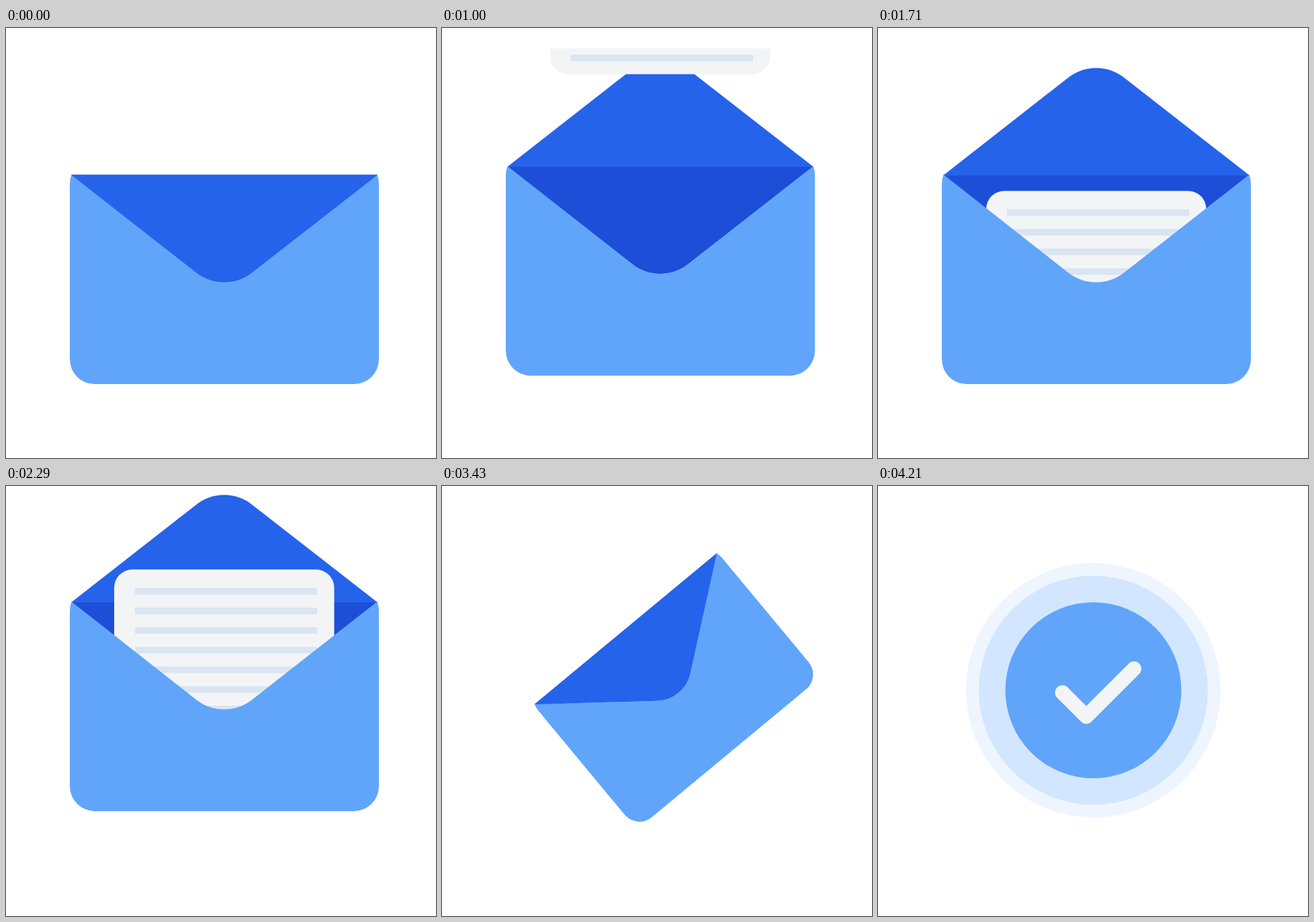
An HTML page for the animation above (4780 ms loop, 640x640 px).

```html
<!DOCTYPE html>
<html lang="en">
<head>
<meta charset="utf-8">
<title>Envelope</title>
<style>
  html, body { margin: 0; width: 100%; height: 100%; overflow: hidden; background: #fff; }
  svg { display: block; width: 100%; height: 100%; }
</style>
</head>
<body>
<svg viewBox="0 0 640 640">
  <defs>
    <path id="triangle" d="M97 218.6L283 364A67 67 0 0 0 366.4 364L553 218.6Z"/>
    <clipPath id="window"><rect x="90" y="43" width="470" height="487"/></clipPath>
  </defs>
  <g id="envelope">
    <use href="#triangle" fill="#1d4ed8"/>
    <use id="flapBack" href="#triangle" fill="#2563eb"/>
    <g clip-path="url(#window)">
      <g id="paper">
        <rect x="161" width="327.5" height="261" rx="27" fill="#f3f4f6"/>
      </g>
    </g>
    <path fill="#60a5fa" d="M97.5 218.3L283 364A67 67 0 0 0 366.4 364L552.5 218.3Q555 225 555 232V493A37 37 0 0 1 518 530H132A37 37 0 0 1 95 493V232Q95 225 97.5 218.3Z"/>
    <use id="flapFront" href="#triangle" fill="#2563eb"/>
  </g>
  <g id="badge">
    <circle id="halo" cx="320.5" cy="304" fill="#eff5ff"/>
    <circle id="ring" cx="320.5" cy="304" fill="#d2e6ff"/>
    <circle id="disc" cx="320.5" cy="304" fill="#60a5fa"/>
    <path id="check" d="M274.5 307.5L310 343L381 272" fill="none" stroke="#f3f4f6"
      stroke-width="22" stroke-linecap="round" stroke-linejoin="round"
      pathLength="1" stroke-dasharray="1 2"/>
  </g>
</svg>
<script>
const LOOP = 4780, FPS = 14, HINGE = 219;
const el = id => document.getElementById(id);
const set = (id, name, value) => el(id).setAttribute(name, value);
const show = (id, visible) => set(id, 'visibility', visible ? 'visible' : 'hidden');

const span = (t, from, to) => Math.min(1, Math.max(0, (t - from) / (to - from)));
const ease = (t, from, to) => (1 - Math.cos(Math.PI * span(t, from, to))) / 2;
const easeOut = (t, from, to) => 1 - (1 - span(t, from, to)) ** 3;

for (let i = 0; i < 8; i++) {
  const line = document.createElementNS('http://www.w3.org/2000/svg', 'rect');
  const box = { x: 192, y: 27.5 + i * 29.2, width: 271, height: 9.8, fill: '#dae5f1' };
  for (const name in box) line.setAttribute(name, box[name]);
  el('paper').append(line);
}

function drawEnvelope(t) {
  const hop = ease(t, 0, 600) - ease(t, 600, 1200) + ease(t, 1800, 2400) - ease(t, 2400, 2980);
  const tilt = ease(t, 3200, 3450);
  const scale = 1 - span(t, 3200, 3680) ** 2;
  const x = 325 + 25.5 * tilt - 30 * ease(t, 3450, 3680);
  const y = 374 - 50.5 * hop - 70.3 * tilt;
  set('envelope', 'transform',
    `translate(${x} ${y}) rotate(${-40.4 * tilt}) scale(${scale}) translate(-325 -374)`);
  show('envelope', scale > 0);

  // 1 is closed (pointing down), -1 is fully open
  const flap = 1 - 2 * (ease(t, 380, 815) - ease(t, 2400, 2880));
  for (const id of ['flapBack', 'flapFront'])
    set(id, 'transform', `translate(0 ${HINGE}) scale(1 ${flap}) translate(0 ${-HINGE})`);
  el('flapBack').style.display = flap < 0 ? '' : 'none';
  el('flapFront').style.display = flap < 0 ? 'none' : '';

  const lift = ease(t, 1800, 2400) - ease(t, 2400, 2700);
  set('paper', 'transform', `translate(0 ${-225 + 476 * ease(t, 800, 1800) - 88.2 * lift})`);
}

function drawBadge(t) {
  set('disc', 'r', 131 * easeOut(t, 3600, 4000));
  set('ring', 'r', 170.5 * easeOut(t, 3680, 4120));
  set('halo', 'r', 189.5 * easeOut(t, 3720, 4200));
  const stroke = ease(t, 3880, 4200);
  set('check', 'stroke-dashoffset', 1 - stroke);
  show('check', stroke > 0);
}

function render(now) {
  const frame = Math.floor((now % LOOP + 5) * FPS / 1000);
  const t = Math.min(frame * 1000 / FPS, LOOP - 1);
  drawEnvelope(t);
  drawBadge(t);
}

const start = performance.now();
function tick() {
  render(performance.now() - start);
  requestAnimationFrame(tick);
}
tick();
</script>
</body>
</html>
```
